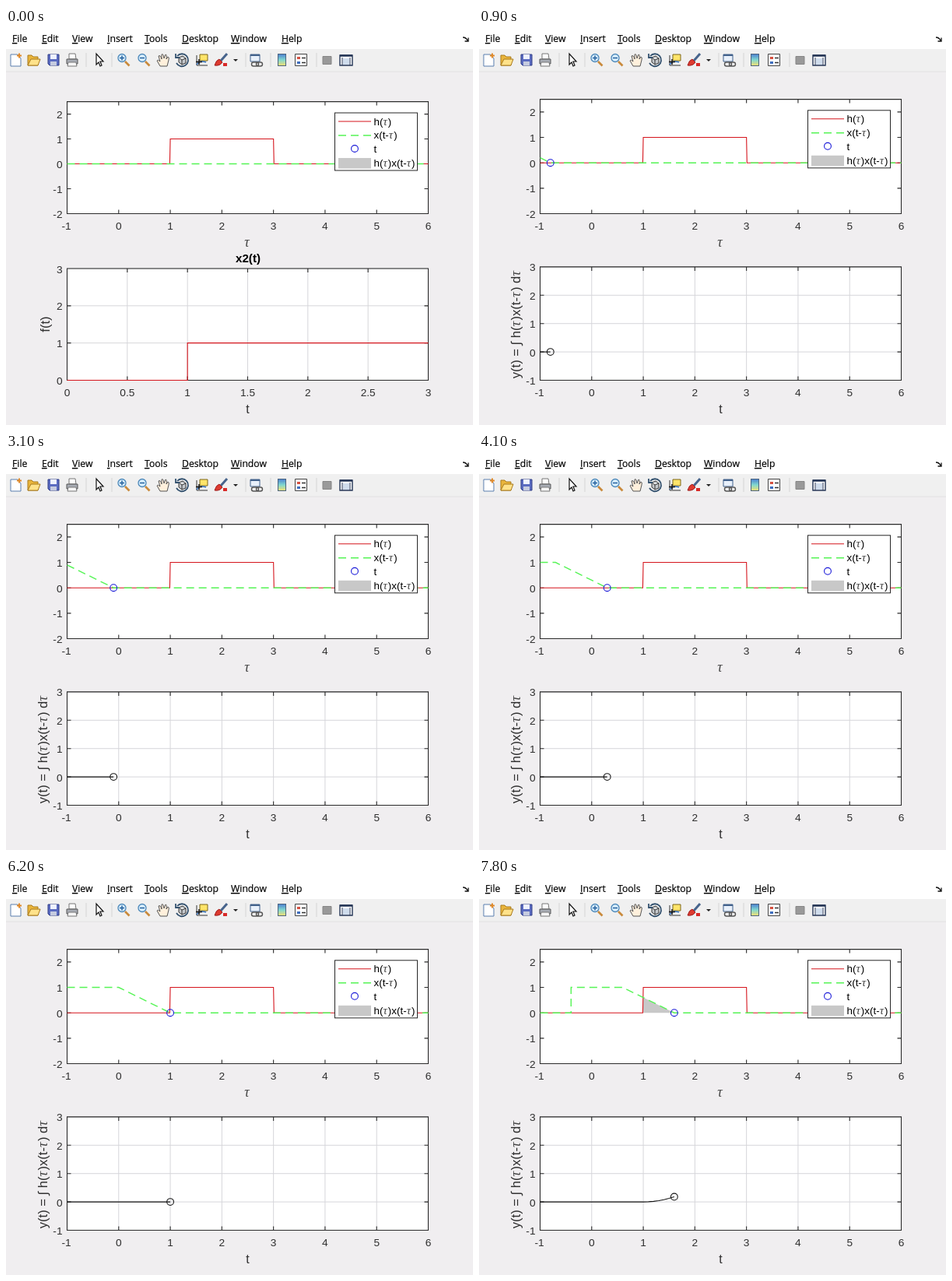
Animation, 600 px wide and 510 px high, one loop 8 s. Source, as an HTML page:

```html
<!DOCTYPE html>
<html lang="en">
<head>
<meta charset="utf-8">
<title>Convolution</title>
<style>
  html, body { margin: 0; width: 100%; height: 100%; overflow: hidden; background: #f0eef0; }
  svg { display: block; width: 600px; height: 510px; }
  text { font-family: "Liberation Sans", Arial, sans-serif; fill: #2e2e2e; }
  .menu text { font: 12.2px "Open Sans", sans-serif; fill: #000; stroke: #000; stroke-width: .2px; }
  .menu tspan { text-decoration: underline; }
  .tick { font-size: 13.7px; }
  .label { font-size: 16px; }
  .side { font-size: 16.6px; }
  .title { font-size: 15.2px; font-weight: bold; fill: #000; }
  .key { font-size: 13.4px; fill: #000; }
  .greek { font-family: "Liberation Serif", serif; font-style: italic; font-size: 1.12em; letter-spacing: .07em; fill: #444; }
  .mid { text-anchor: middle; }
  .end { text-anchor: end; }
  .axis { fill: none; stroke: #2b2b2b; stroke-width: 1.1; }
  .grid { fill: none; stroke: #d6d6da; }
  .h { fill: none; stroke: #d5141c; stroke-width: 1.1; }
  .x { fill: none; stroke: #55f455; stroke-width: 1.4; stroke-dasharray: 10 6; }
  .area { fill: #c8c8c8; }
  .blue { fill: none; stroke: #1818d8; stroke-width: 1.1; }
  .black { fill: none; stroke: #151515; stroke-width: 1.1; }
</style>
</head>
<body>
<svg id="stage" viewBox="0 0 600 510"></svg>
<script>
const LOOP = 8000;
// Start of each 0.1 step of t, in tenths of a second; t begins at -1.
const STEPS = [2, 4, 7, 10, 13, 16, 19, 22, 25, 28, 32, 34, 38, 41, 44, 47, 50, 53,
               55, 58, 61, 64, 67, 70, 72, 75, 78];
const LEFT = 78.5, RIGHT = 542.5;

const tau = s => s.replace(/τ/g, '<tspan class="greek">τ</tspan>');
const text = (x, y, cls, s) => `<text x="${x}" y="${y}" class="${cls}">${tau(s)}</text>`;
const path = (cls, d) => `<path class="${cls}" d="${d}"/>`;
const poly = pts => 'M' + pts.map(p => p.map(v => v.toFixed(2)).join(' ')).join('L');
const range = (a, b, step) =>
  Array.from({ length: Math.round((b - a) / step) + 1 }, (_, i) => a + i * step);

function makeAxes({ x0, x1, dx, y0, y1, top, bottom, grid }) {
  const X = v => LEFT + (v - x0) / (x1 - x0) * (RIGHT - LEFT);
  const Y = v => bottom - (v - y0) / (y1 - y0) * (bottom - top);
  let ticks = '', lines = '', labels = '';
  for (const v of range(x0, x1, dx)) {
    const x = X(v);
    ticks += `M${x} ${bottom}v-5M${x} ${top}v5`;
    lines += `M${x} ${top}V${bottom}`;
    labels += text(x - (v < 0 ? 1 : 0), bottom + 20.5, 'tick mid', String(v));
  }
  for (const v of range(y0, Math.floor(y1), 1)) {
    const y = Y(v);
    ticks += `M${LEFT} ${y}h5M${RIGHT} ${y}h-5`;
    lines += `M${LEFT} ${y}H${RIGHT}`;
    labels += text(72.5, y + 5.5, 'tick end', String(v));
  }
  const box = `M${LEFT} ${top}H${RIGHT}V${bottom}H${LEFT}Z`;
  return {
    X, Y,
    back: `<path d="${box}" fill="#fff"/>` + (grid ? path('grid', lines) : ''),
    frame: path('axis', box + ticks) + labels
  };
}

function legend(y) {
  const rows = ['h(τ)', 'x(t-τ)', 't', 'h(τ)x(t-τ)'];
  return `<g transform="translate(0 ${y})">
    <rect x="422.5" y=".5" width="106" height="74" fill="#fff" stroke="#262626"/>
    ${path('h', 'M427 11.5H469')}${path('x', 'M427 29.5H469')}
    <circle cx="448" cy="46.5" r="4.4" class="blue"/>
    <rect x="427" y="58.5" width="42" height="13.5" class="area"/>
    ${rows.map((s, i) => text(472.5, 16 + 17.8 * i, 'key', s)).join('')}</g>`;
}

const signalAxes = top => makeAxes({ x0: -1, x1: 6, dx: 1, y0: -2, y1: 2.5, top, bottom: 238.5 });
const pulse = ({ X, Y }) =>
  poly([[-1, 0], [0.99, 0], [1, 1], [3, 1], [3.01, 0], [6, 0]].map(([x, y]) => [X(x), Y(y)]));
const sideLabel = (x, s) =>
  `<text class="side mid" transform="translate(${x} 380.5) rotate(-90)">${tau(s)}</text>`;
const bottomLabels = text(310, 281, 'label mid', 'τ') + text(310.5, 495, 'label mid', 't');

function introScene() {
  const a = signalAxes(94.6);
  const b = makeAxes({ x0: 0, x1: 3, dx: 0.5, y0: 0, y1: 3, top: 309, bottom: 452.5, grid: true });
  const step = poly([[0, 0], [1, 0], [1, 1], [3, 1]].map(([x, y]) => [b.X(x), b.Y(y)]));
  return a.back + a.frame + path('h', pulse(a)) + path('x', `M${LEFT} ${a.Y(0)}H${RIGHT}`) + legend(108.5)
    + b.back + b.frame + path('h', step) + text(311, 301, 'title mid', 'x2(t)')
    + sideLabel(56, 'f(t)') + bottomLabels;
}

const signal = signalAxes(91.6);
const out = makeAxes({ x0: -1, x1: 6, dx: 1, y0: -1, y1: 3, top: 306.9, bottom: 452.5, grid: true });

function mainScene() {
  return signal.back + '<path id="area" class="area"/>' + signal.frame + path('h', pulse(signal))
    + '<path id="shifted" class="x"/><circle id="dot" r="4.4" class="blue"/>' + legend(105.3)
    + out.back + out.frame
    + '<path id="curve" class="black"/><circle id="head" r="4.4" class="black"/>'
    + sideLabel(52.5, 'y(t) = ∫ h(τ)x(t-τ) dτ') + bottomLabels;
}

function menu() {
  const items = { File: 8, Edit: 46, View: 85, Insert: 130, Tools: 178, Desktop: 226, Window: 289, Help: 354 };
  return '<rect width="600" height="27" fill="#fff"/><g class="menu">'
    + Object.entries(items).map(([s, x]) =>
      `<text x="${x}" y="18"><tspan>${s[0]}</tspan>${s.slice(1)}</text>`).join('')
    + '</g><path d="M587 12q4 0 6 4M594 12.5v4.5h-4.5" fill="none" stroke="#111" stroke-width="1.3"/>';
}

// Each icon is drawn around its own centre.
function toolbar() {
  const at = (x, s) => `<g transform="translate(${x} 41)">${s}</g>`;
  const shape = (d, fill = 'none', stroke = 'none', w = 1) =>
    `<path d="${d}" fill="${fill}" stroke="${stroke}" stroke-width="${w}"/>`;
  const zoom = sign => shape('M2 2L7.500 7.500', 'none', '#c98a3c', 2.6)
    + '<circle cx="-2" cy="-2.5" r="5" fill="#d9efff" stroke="#4b87b8" stroke-width="1.3"/>'
    + shape(sign, 'none', '#24609c', 1.5);
  const icons = [
    [12, shape('M-6-7H3L7-2V8H-6Z', '#fff', '#5b7fae') + shape('M5-8.500v6M2-5.500h6', 'none', '#e08a2a', 2)],
    [36, shape('M-8 7V-6H-3L-1-4H5V7Z', '#e9b53c', '#a87a1c') + shape('M-8 7L-4-1H8L5 7Z', '#ffe28a', '#a87a1c')],
    [61, shape('M-7-7H7V7H-5L-7 5Z', '#5a6bc0', '#2f3c86') + shape('M-4-7H4V-1H-4Z', '#eef2ff')
      + shape('M-4 7V2H4V7Z', '#c5cbe0')],
    [85, shape('M-4-1V-8H4L5-1Z', '#fff', '#777') + shape('M-7-1H7V5H-7Z', '#a8acb4', '#555')
      + shape('M-5 3H5L6 8H-6Z', '#f6f6f6', '#777')],
    [119, shape('M-3-8V6L0 3L2 8L4 7L2 2H6Z', '#fff', '#111', 1.2)],
    [151, zoom('M-5-2.500H1M-2-5.500V.5')],
    [177, zoom('M-5-2.500H1')],
    [202, shape('M-4 8L-8 1Q-7-1-4 2L-6-5Q-4-7-2-1L-2-7Q0-9 1-2L3-7Q5-7 4-1L6-4Q8-4 7 0L5 8Z', '#fff0dc', '#555')],
    [226, shape('M-4-3L1-5L5-2V4L0 6L-4 3ZM-4-3L0 0L5-2M0 0V6', '#c4c8cc', '#333')
      + shape('M-6-5A8 8 0 1 1-7 4M-8-8V-3H-3', 'none', '#34526f', 1.8)],
    [251, shape('M-2-7H8V1H-2Z', '#ffe56a', '#7c6618') + shape('M-6-6V7H8', 'none', '#333')
      + shape('M-6 6Q-2 0 6 3', 'none', '#3070c0', 1.4) + shape('M-3-1v7M-7 2.500h8', 'none', '#111', 1.5)],
    [276, shape('M8-8L0 1', 'none', '#47648c', 3) + shape('M-8 7Q-6 0-2-1L2 3Q-1 8-8 7Z', '#dd3b30', '#a02020')
      + shape('M3 4h5v4h-5Z', '#d82a28')],
    [295, shape('M-3-1H3L0 2Z', '#222')],
    [321, shape('M-7-7H5V2H-7Z', '#e8f0fa', '#41618b') + shape('M-7-6H5', 'none', '#41618b', 2)
      + shape('M-3 3h4a2 2 0 0 1 0 5h-4a2 2 0 0 1 0-5ZM3 3h3a2 2 0 0 1 0 5h-3a2 2 0 0 1 0-5Z', 'none', '#555', 1.4)],
    [354, '<rect x="-4.5" y="-7.5" width="10" height="15" fill="url(#bar)" stroke="#4d6580"/>'],
    [379, shape('M-7.500-7.500H7.500V7.500H-7.500Z', '#fff', '#444') + shape('M-5-4h4v3h-4Z', '#d65040')
      + shape('M-5 2h4v3h-4Z', '#3f6fc0') + shape('M1-2.500h5M1 3.500h5', 'none', '#333', 1.4)],
    [412, shape('M-5-4.500H6V5.500H-5Z', '#999', '#858585')],
    [437, shape('M-8-6H8V7H-8Z', '#fff', '#243555', 1.4) + shape('M-8-5.500H8', 'none', '#243555', 2.5)
      + shape('M-5-3V7M5-3V7', 'none', '#243555') + shape('M-4-2H4V6H-4Z', '#cfdcec')]
  ];
  const gaps = [103, 136, 308, 340, 399];
  return '<rect y="27" width="600" height="29" fill="#f0f0f0"/><path d="M0 56H600" stroke="#e2e1e2"/>'
    + gaps.map(x => `<path d="M${x} 32V50" stroke="#d4d4d4"/>`).join('')
    + icons.map(([x, s]) => at(x, s)).join('');
}

const byId = id => document.getElementById(id);
byId('stage').innerHTML = `
  <defs><linearGradient id="bar" x2="0" y2="1">
    <stop stop-color="#4c7fd0"/><stop offset=".5" stop-color="#80d8d0"/><stop offset="1" stop-color="#f4e070"/>
  </linearGradient></defs>
  <rect width="600" height="510" fill="#f0eef0"/>${menu()}${toolbar()}
  <g id="intro">${introScene()}</g><g id="main">${mainScene()}</g>`;

const input = s => s < 0 || s > 2 ? 0 : Math.min(s, 1);
const result = t => t > 1 ? (t - 1) ** 2 / 2 : 0;
const onSignal = ([x, y]) => [signal.X(x), signal.Y(y)];
const set = (id, attrs) => {
  for (const k in attrs) byId(id).setAttribute(k, attrs[k]);
};

function render(ms) {
  const k = STEPS.filter(s => s * 100 <= ms).length - 1;
  byId('intro').style.display = k < 0 ? '' : 'none';
  byId('main').style.display = k < 0 ? 'none' : '';
  if (k < 0) return;

  const t = -1 + k / 10;
  const corners = [[t - 2, 0], [t - 2, 1], [t - 1, 1], [t, 0]].filter(p => p[0] > -1);
  const shifted = [[-1, input(t + 1)], ...corners, [6, 0]];
  const area = t > 1 ? poly([[1, 0], [1, t - 1], [t, 0]].map(onSignal)) + 'Z' : '';
  const curve = range(-1, t, 0.1).map(v => [out.X(v), out.Y(result(v))]);

  set('shifted', { d: poly(shifted.map(onSignal)) });
  set('area', { d: area });
  set('curve', { d: poly(curve) });
  set('dot', { cx: signal.X(t), cy: signal.Y(0) });
  set('head', { cx: out.X(t), cy: out.Y(result(t)) });
}

const start = performance.now();
function loop() {
  render((performance.now() - start) % LOOP);
  requestAnimationFrame(loop);
}
loop();
</script>
</body>
</html>
```
